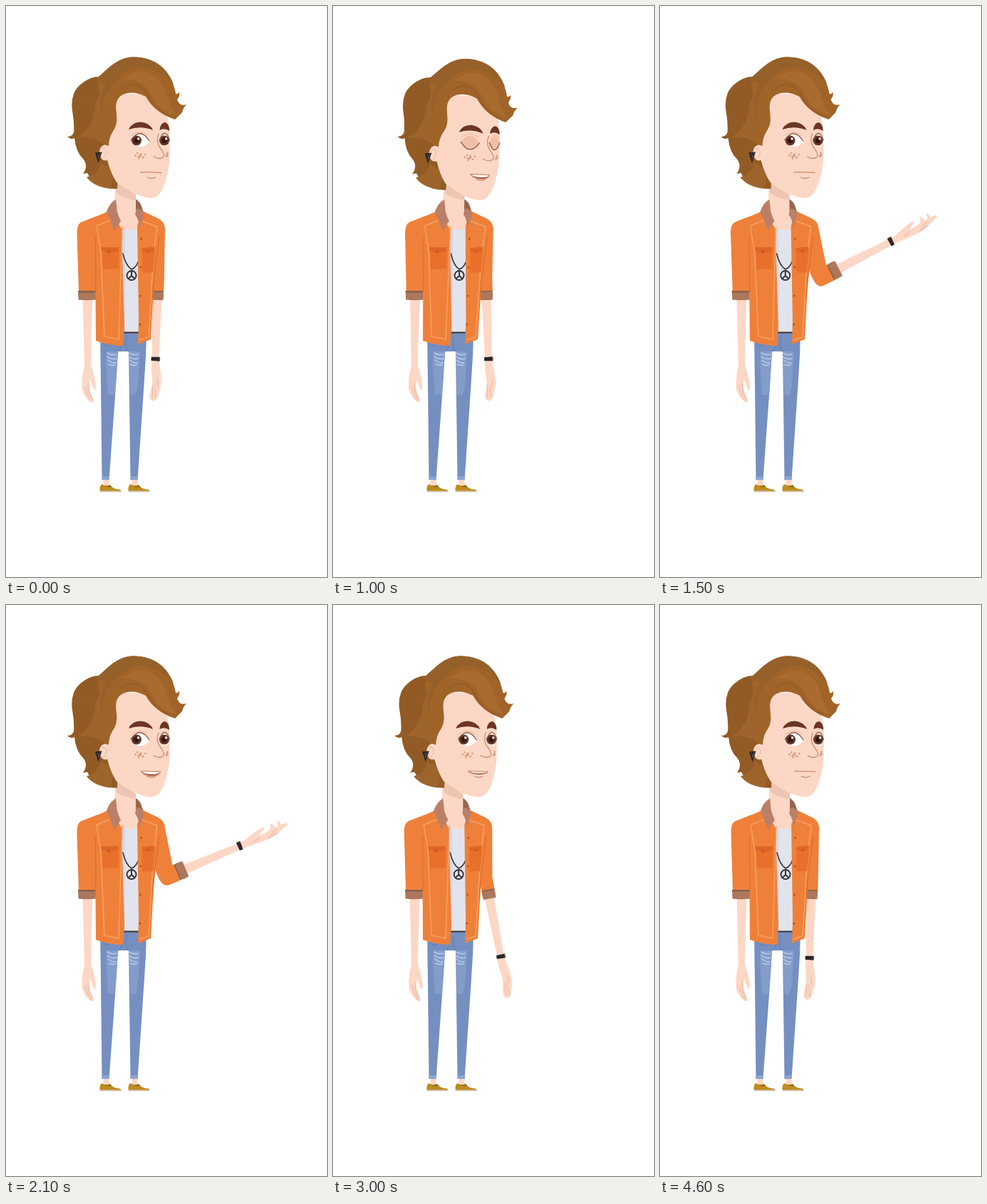
Recreate the animation shown at these times as an HTML page. Size 450 px wide and 800 px high, loop 4700 ms.

```html
<!DOCTYPE html>
<html lang="en">
<head>
<meta charset="utf-8">
<title>Talking character</title>
<style>
  html, body { margin: 0; width: 100%; height: 100%; overflow: hidden; background: #fff; }
  svg { display: block; width: 100vw; height: 100vh; }
  .skin { fill: #fdd7c5; }
  .orange { fill: #ef8039; }
  .line { fill: none; stroke-linecap: round; stroke-linejoin: round; }
  .stitch { stroke: #f7a066; stroke-width: 1.5; }
  .fold { stroke: #d96a28; stroke-width: 1; }
  .crease { stroke: #e9b7a0; stroke-width: 1; }
  .feature { stroke: #c99173; stroke-width: 1.3; }
  .pocket { fill: #e8702b; }
  .flap { fill: #df6526; }
  .button { fill: #b9502a; }
  .cuff { fill: #ac775d; }
  .band { fill: #85604c; }
</style>
</head>
<body>
<svg viewBox="0 0 450 800">
  <defs>
    <g id="leg">
      <path class="skin" d="M136 660H144L145 673H137Z"/>
      <path fill="#bd8c1e" d="M131.500 679Q131 672 134.500 670Q141 674 146 671Q150 677 160 677.500L161.500 680Z"/>
      <path fill="#8e6a1c" d="M138 672Q143 673 146 671L148 674Q143 675 138 672Z"/>
      <path fill="#d0bda0" d="M131.500 679H161.500V681H132Z"/>
    </g>
    <path id="rips" class="line" stroke="#b8cae7" stroke-width="1.600" d="M142 486Q148 490 155 488M142 491Q148 496 155 494M143 496Q149 501 154 500M144 502Q148 504 153 503"/>
  </defs>

  <g id="legs">
    <use href="#leg"/><use href="#leg" x="40"/>
    <path fill="#758fc0" d="M132 455H197L196 490L193.500 530L184.500 664H174.500L172 484H157L154 532L144.500 664H134.500L133 530Z"/>
    <path fill="#839dca" d="M141 484H157L154 530L152 545H143L140 500ZM173 484H188L185 530L182 545H174Z"/>
    <path fill="#8ca5d1" d="M134.500 659H144.800L144.500 664H134.500ZM174.500 659H184.800L184.500 664H174.500Z"/>
    <path class="line" stroke="#5f7bb1" stroke-width="1" d="M164 462L163 476Q160 483 157 484M169 462L168 479L172 484M136 472Q139 478 146 476"/>
    <use href="#rips"/><use href="#rips" x="30"/>
  </g>

  <g id="body">
    <g id="rightArm">
      <g id="forearm">
        <path class="skin" d="M24 -6.500L108 -5Q115 -4 120 -4.500V4.500L108 4.500L24 7Z"/>
        <g id="restHand">
          <path class="skin" d="M108 -5L120 -6Q146 -12 155 -8Q167 -6 169 -3Q174 0 170 3Q169 6 165 6Q156 5 149 3L142 3Q130 5 118 5Z"/>
          <path class="line crease" d="M150 -1L168 -3M149 2L168 2M140 -4L151 -5"/>
        </g>
        <g id="openHand">
          <path class="skin" d="M108 -5L118 -4C130 -8 140 -11 152 -12Q157 -10 150 -8L142 -3L157 -4Q163 -6 163.500 -12Q167 -15 167.500 -6L171 -5Q174 -8 174 -13Q178 -14 177 -6L185 -5.500Q188 -3 184 -1.500L172 2Q165 6 155 6Q140 6.500 118 4Z"/>
          <path class="line crease" d="M143 -2Q138 2 132 1M158 2L170 -3M154 5L168 2"/>
        </g>
        <g id="flatHand">
          <path class="skin" d="M108 -5L118 -4Q130 -9 142 -7L156 -6Q167 -3 172 1Q174 5 165 4L152 6Q138 6 118 4Z"/>
          <path class="line crease" d="M140 -3L153 -2L168 2M146 2L165 4"/>
        </g>
        <path fill="#2b2528" d="M109.500 -6.500H115.500L115 5.500H110Z"/>
        <path fill="#6b5a50" d="M110.500 -7H114.500V-5.500H110.500Z"/>
        <g id="cuff">
          <path class="cuff" d="M16 -11.500Q22 -13 30 -11.500V11.500Q22 13 16 11.500Z"/>
          <path class="band" d="M16 -11.500H18.500V11.500H16Z"/>
        </g>
      </g>
      <path id="sleeve" class="orange"/>
    </g>

    <path class="skin" d="M107.500 408H121.500L119.500 470L119 504Q125 519 126 535Q125 541 122 535L118 524Q116 531 118 540L123 553Q122 557 118 554Q110 548 107 538Q105 522 110 504Z"/>
    <path class="line crease" d="M111 533Q113 544 119 553M115 529Q114 540 121 551"/>
    <path class="orange" d="M128 294L105 303Q99 307 99.500 319L102 401H126.500L128 320Z"/>
    <path class="cuff" d="M101 400Q113 401 126 399.500V411.500Q113 413 101.500 411.500Z"/>
    <path class="band" d="M101 399H126V401.200Q113 402 101 401.200Z"/>

    <path fill="#e2e4ed" d="M160 308H188V458H162Z"/>
    <path fill="#d6d9e4" d="M163 310H167V457H164Z"/>
    <path fill="#3b3434" d="M162 456.500H188V458.500H162Z"/>
    <path fill="#96664f" d="M181 270Q189 274 191 284L194 292L187 306L179 296Z"/>
    <path class="skin" d="M153.500 235H182V287Q187 295 186 312Q174 316 161 311L152 290Z"/>
    <path fill="#eec5b3" d="M154 245L182 265V272Q166 270 155 262Z"/>
    <path class="line" stroke="#343034" stroke-width="1.500" d="M164 347Q168 364 176 369Q184 366 187 353"/>
    <g class="line" stroke="#343034" stroke-width="1.900">
      <circle cx="176" cy="377.500" r="6.500"/>
      <path d="M176 371V378L171.500 382M176 378L180.500 382"/>
    </g>

    <path class="orange" d="M147 286L124 296L125 340L126 469Q145 476 164 476L166 450L162 312Z"/>
    <path class="orange" d="M191 287L214 298Q223 303 223 313L214 330L207 395L203 467L185 474L186 440L184 308Z"/>
    <path class="line fold" d="M125.500 325L126 399M215 323L207 385L205 410"/>
    <path class="line stitch" d="M127 308L133 345L138 463L158 467L163 310M127 308L147 300M190 301L212 309L207 345L200 464L187 468"/>
    <path class="pocket" d="M134 338H158L157.500 368L136 369ZM191 340L209 338L206 373L191 374Z"/>
    <path class="flap" d="M133 338H158V343L145 347L134 343ZM191 339L208 337L207 343L199 346L191 343Z"/>
    <g id="buttons" class="button">
      <circle cx="144" cy="344" r="1.500"/><circle cx="200" cy="343" r="1.300"/>
    </g>
    <path fill="#ba8067" d="M154 271Q145 276 141 288L152 315L161 301Q155 290 155 280Z"/>
    <path fill="#ba8067" d="M183 284Q190 283 194 291L187 313Q187 300 181 292Z"/>
  </g>

  <g id="head">
    <path fill="#925b25" d="M130 99C115 99 99 112 95 123Q91 134 93 147Q96 163 95 177Q93 183 86 183Q91 188 96 185Q98 205 108 214Q116 224 108 235L114 234Q119 246 134 252Q145 257 156 256L158 195L168 115Z"/>
    <path fill="#9d652b" d="M134 125C121 133 128 151 119 165Q111 178 100 185Q122 180 139 195L151 166Q140 145 134 125Z"/>
    <path fill="#9d652b" d="M133 220Q129 235 113 240Q124 254 147 256L152 230Z"/>
    <path class="skin" d="M155 122L220 125L229 170Q230 190 229 220Q225 248 217 261Q211 270 201 269Q182 267 155 247Q147 235 142 216Q132 219 131 204Q132 194 142 194L148 165Z"/>
    <path class="line crease" d="M135 200Q141 198 141 207Q139 211 137 213"/>
    <path fill="#272124" d="M125 205.500L134.500 204.500L129.500 220Z"/>
    <path class="line" stroke="#73696b" stroke-width=".7" d="M128 207L131 213M132 206L129 214"/>

    <path fill="#a06328" d="M128 101C143 88 156 72 178 71.500C210 71 234 96 238 123Q241 124 243 120.500Q244 126 240 131Q243 141 253 138Q248 143 247 149L237 159C219 153 205 143 196 127C182 119 162 119 156 132C150 145 162 160 149 177Q144 186 144 196L138 194Q132 174 134 150Z"/>
    <path fill="#96602a" d="M128 101C143 88 156 72 178 71.500C207 71 226 86 235 110C205 76 174 82 161 98C143 114 132 130 136 157Q127 130 140 111Z"/>
    <path fill="#aa6b2e" d="M164 103C188 79 215 95 224 119Q229 140 239 153Q214 149 203 123C194 105 176 102 164 103Z"/>
    <path class="line" stroke="#8c5722" stroke-width="1" d="M162 116C177 104 192 110 200 128Q209 145 227 153M132 104Q117 114 114 134"/>

    <g id="brows" fill="#6d3524">
      <path d="M172 173Q176 163 189 162.500Q202 164 206 174Q189 167 172 173Z"/>
      <path d="M215.500 174Q216 164 223 163Q229 165 229 175Q222 170 215.500 174Z"/>
    </g>
    <g id="openEyes">
      <path fill="#fff" d="M175 188Q177 179 188 178.500Q199 180 201 190Q197 197 188 197.500Q179 197 175 188ZM215 188Q217 179 223 179Q229 181 229.500 188Q228 197 222 197Q217 196 215 188Z"/>
      <g id="irises"></g>
    </g>
    <path id="lids" fill="#f1bea6"/>
    <path id="lashes" class="line" stroke="#8f5a45" stroke-width="1.300"/>
    <path class="line crease" d="M176 181Q188 172 199 181M217 180Q223 174 228 181"/>
    <path class="line feature" d="M214 179Q210 188 215 197Q223 207 221 211Q216 216 207 211"/>
    <g id="freckles" fill="#d8a084"></g>
    <path id="mouth" fill="#ab5744"/>
    <path id="teeth" fill="#fff"/>
    <path id="lips" class="line feature"/>
    <path class="line feature" d="M198 240Q204 243 210 240"/>
  </g>
</svg>
<script>
const LOOP = 4700, STEP = 100, RAD = Math.PI / 180;
const $ = id => document.getElementById(id);
const set = (id, name, value) => $(id).setAttribute(name, value);
const mix = (a, b, k) => a + (b - a) * k;
const clamp = v => Math.max(0, Math.min(1, v));
const dot = (x, y, r, fill = '') => `<circle cx="${x}" cy="${y}" r="${r}" ${fill && `fill="${fill}"`}/>`;

// Smooth step from 0 to 1 between two times, and a rise followed by a fall.
function ease(t, from, to) {
  const k = clamp((t - from) / (to - from));
  return k * k * (3 - 2 * k);
}
const pulse = (t, from, peak, to) => ease(t, from, peak) - ease(t, peak, to);

function addDots() {
  for (let i = 0; i < 4; i++) $('buttons').innerHTML += dot(189.7 - i * .7, 326 + i * 40, 1.5);
  for (const x of [183, 222]) {
    $('irises').innerHTML += dot(x, 188.5, 7, '#673727') + dot(x, 188.5, 3.9, '#321a17') + dot(x + 2.5, 186, 1.7, '#fff');
  }
  const scatter = (x, y, rx, ry, count) => {
    for (let i = 0; i < count; i++) {
      const angle = i * 2.4, reach = Math.sqrt(i / count);
      $('freckles').innerHTML += dot(x + rx * reach * Math.cos(angle), y + ry * reach * Math.sin(angle), 1.9 - reach * .7);
    }
  };
  scatter(188.5, 210, 10, 4.5, 8);
  scatter(226, 209, 2.5, 4, 3);
}

function drawArm(t) {
  const raise = ease(t, 975, 1200), settle = ease(t, 1200, 1800);
  const point = ease(t, 2400, 2650), drop = ease(t, 2750, 3080);
  const upper = 9.5 * raise - 3.5 * point - 6 * drop;
  const lower = 92 - 123 * raise + 8.5 * settle + 29 * point + 85.5 * drop;

  const a = upper * RAD, b = lower * RAD;
  const elbow = [213 + 67 * Math.sin(a), 315 + 67 * Math.cos(a)];
  const half = mix(8.7, 12, clamp((92 - lower) / 80));
  const inner = Math.min(17, half * Math.tan((90 - upper - lower) * RAD / 2));
  const along = [Math.cos(b), Math.sin(b)], side = [Math.sin(b), -Math.cos(b)];
  const at = (d, n) => [0, 1].map(i => (elbow[i] + along[i] * d + side[i] * n).toFixed(2)).join(' ');

  set('sleeve', 'd', `M205 302L214 299Q222 303 223 313L${at(inner, half)}L${at(17, half)}L${at(17, -half)}` +
    `L${at(0, -half)}Q${at(-14, -half)} 207 362L203 330Z`);
  set('forearm', 'transform', `translate(${elbow}) rotate(${lower})`);
  set('cuff', 'transform', `scale(1 ${half / 12})`);
  const hand = lower > 45 ? 'restHand' : point > .5 ? 'flatHand' : 'openHand';
  for (const id of ['restHand', 'openHand', 'flatHand']) set(id, 'display', id === hand ? 'inline' : 'none');
}

function drawEyes(t) {
  const shut = clamp(1.5 * pulse(t, 800, 1000, 1200));
  const y = mix(169, 208, shut);
  set('lids', 'd', `M175 188Q188 169 201 189Q188 ${y} 175 188M215 188Q223 169 229.500 188Q223 ${y} 215 188`);
  set('lashes', 'd', `M175 188Q188 ${y} 201 189M215 188Q223 ${y} 229.500 188`);
  set('openEyes', 'display', shut > .9 ? 'none' : 'inline');
  set('brows', 'transform', `translate(0 ${shut * 1.5})`);
}

function drawMouth(t) {
  const talking = ease(t, 0, 200) * (t < 3900);
  const loudness = 7 + 11 * ease(t, 2900, 3300);
  const open = talking * loudness * Math.sin((t - 300) / 1200 * Math.PI) ** 2;
  const left = 188.5 + open * .15, right = 217.5 - open * .15;
  const top = `M${left} 233Q203 ${232.5 + open * .05} ${right} 233.500`;
  const bowl = depth => `${top}C${right - 3} ${233 + depth * 1.3} ${left + 7} ${233 + depth * 1.3} ${left} 233Z`;
  set('mouth', 'd', bowl(open));
  set('teeth', 'd', bowl(Math.min(open * .6, 5.5)));
  set('lips', 'd', open > .5 ? bowl(open) : top);
}

function drawPose(t) {
  const nod = pulse(t, 700, 1000, 1300), turn = pulse(t, 2400, 2700, 3100);
  const back = pulse(t, 1200, 1500, 2300), breath = pulse(t, 4100, 4400, 4700);
  const lean = (1.8 * nod + 1.5 * turn - .5 * back + .25 * breath) / 175;
  set('body', 'transform', `matrix(1 0 ${-lean} 1 ${lean * 475} 0)`);
  set('head', 'transform', `translate(${2 * nod + 1.2 * turn - .5 * back} ${2 * nod}) rotate(${1.6 * nod + .2 * turn} 165 268)`);
}

function draw(t) {
  drawPose(t);
  drawArm(t);
  drawEyes(t);
  drawMouth(t);
}

addDots();
const start = performance.now();
function tick() {
  const t = (performance.now() - start) % LOOP;
  draw(Math.floor(t / STEP) * STEP);
  requestAnimationFrame(tick);
}
tick();
</script>
</body>
</html>
```
